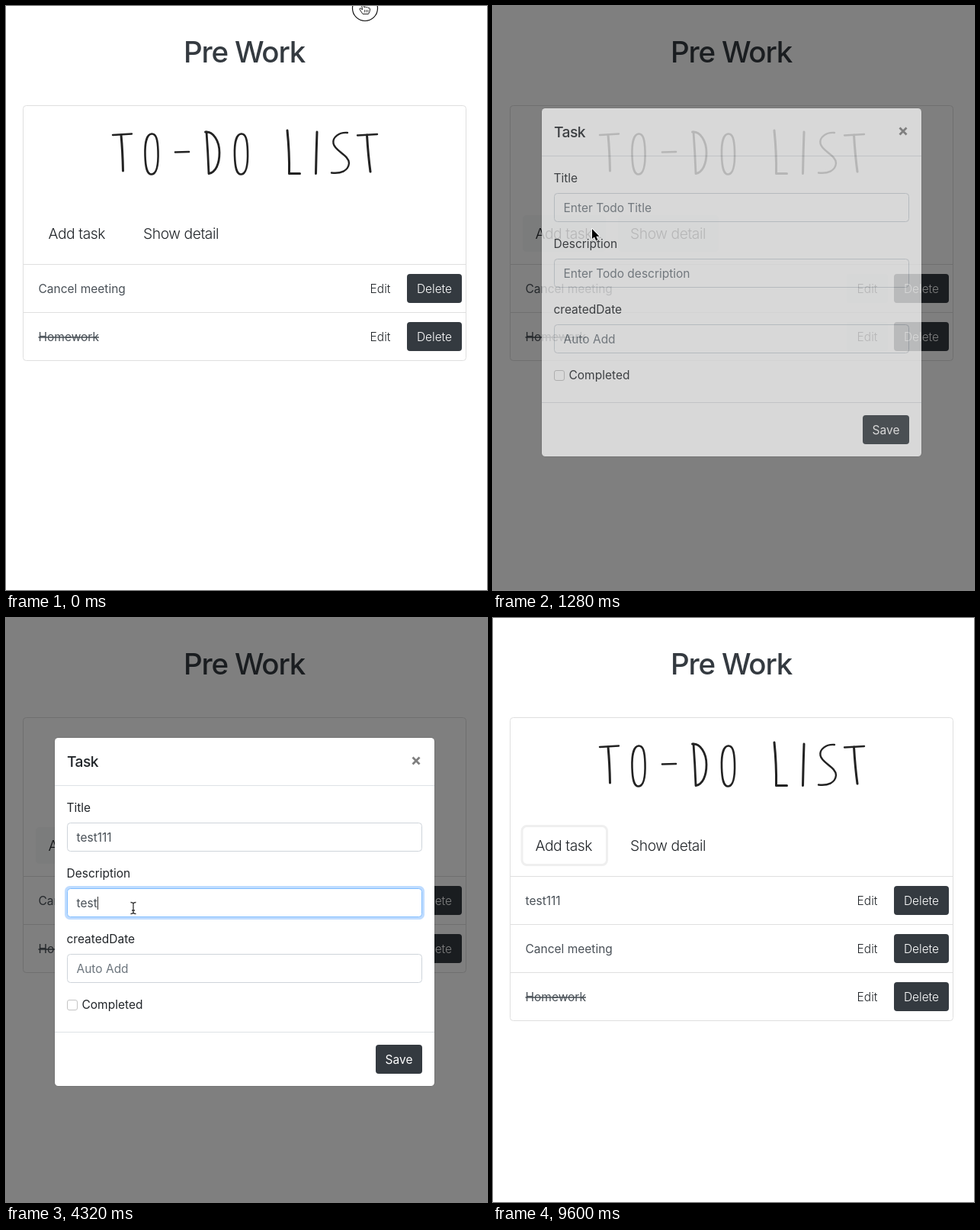
Write an HTML page that moves like this. It is 631 px wide and 765 px high and loops after 9760 ms.

```html
<!DOCTYPE html>
<html lang="en">
<head>
<meta charset="utf-8">
<title>To-do list</title>
<style>
  html, body { margin: 0; width: 100%; height: 100%; overflow: hidden; background: #fff; }
  svg { display: block; width: 631px; height: 765px; }
  text {
    font: 400 15.5px Inter, "Open Sans", sans-serif;
    font-optical-sizing: none;
    fill: #212529;
    white-space: pre;
  }
  .mid { text-anchor: middle; }
  .h1 { font-size: 38.5px; font-weight: 500; letter-spacing: -1.2px; fill: #343a40; }
  .h5 { font-size: 19.3px; font-weight: 500; letter-spacing: -.6px; }
  .big { font-size: 19.3px; font-weight: 300; letter-spacing: -.45px; }
  .thin { font-weight: 300; }
  .item, .value { fill: #495057; }
  .done { text-decoration: line-through; }
  .hint { fill: #6c757d; }
  .white { fill: #fff; }
  .dark { fill: #343a40; }
  .light { fill: #f8f9fa; }
  .edge { fill: none; stroke: #dfdfdf; }
  .rule { stroke: #dee2e6; }
  .box { fill: #fff; stroke: #ced4da; }
  .glow { fill: #bfdcff; }
  .focus .box { stroke: #80bdff; }
  .field:not(.focus) .glow, .field:not(.focus) .caret { display: none; }
  .ink { fill: none; stroke: #232323; stroke-width: 3; stroke-linecap: round; stroke-linejoin: round; }
</style>
</head>
<body>
<svg viewBox="0 0 631 765">
  <g id="page">
    <text class="h1 mid" x="312.5" y="73.5">Pre Work</text>
    <rect id="card" class="edge" x="22.5" y="130.5" width="581" height="334" rx="4"/>
    <g class="ink">
      <path d="M140 169L165 167.5M461 169.5L487 168" stroke-width="2.4"/>
      <path d="M151 169Q153 190 153.5 216M473.500 169Q475 195 478 217"/>
      <path id="oval" d="M191 167.500C184 168 182 182 182.500 196C183 212 185 220.500 191 220.500C198 220 200 206 199.500 190C199 175 197 167 191 167.500Z" stroke-width="2.6"/>
      <use href="#oval" x="117.500"/>
      <path d="M222 191.500L240 191" stroke-width="2.6"/>
      <path d="M263 165Q265 192 266 219.500M261.500 165C272 164 280 177 280 192C280 207 275 218 266 219.500" stroke-width="2.8"/>
      <path d="M369 163Q372 192 371.500 219.500L385.500 219.500"/>
      <path d="M408 165Q407 192 406.500 219.500"/>
      <path d="M448 166C437 165 428 172 429.500 180C431 190 450 195 450 206C449 216 439 220 427 218.500" stroke-width="2.4"/>
    </g>
    <rect id="ring" x="38" y="272.500" width="111.500" height="51" rx="6.5" fill="#fff" stroke="#efefef" stroke-width="3"/>
    <g id="plates" class="light">
      <rect x="39" y="274" width="109" height="48" rx="5"/>
      <rect x="164" y="274" width="132" height="48" rx="5"/>
      <rect x="464" y="351" width="54" height="38" rx="4"/>
      <rect x="464" y="414" width="54" height="38" rx="4"/>
    </g>
    <text class="big" x="55.500" y="305">Add task</text>
    <text class="big" x="180" y="305">Show detail</text>
    <g id="rows"></g>
  </g>
  <rect id="shade" width="631" height="765"/>
  <g id="modal">
    <rect x="63.500" y="156.500" width="499" height="457" rx="5" fill="#000" opacity=".2"/>
    <rect class="white" x="64" y="157" width="498" height="456" rx="4.500"/>
    <text class="h5" x="80" y="195">Task</text>
    <path d="M533.500 182.500L542.500 191.500M542.500 182.500L533.500 191.500" stroke="#7f7f7f" stroke-width="2.8"/>
    <path class="rule" d="M64 219.500H562M64 542.500H562"/>
    <g id="fields"></g>
    <rect x="80.500" y="500.500" width="13" height="13" rx="2.500" fill="#fff" stroke="#c4c4c4"/>
    <text x="99.500" y="512">Completed</text>
    <rect class="dark" x="485" y="559" width="61" height="38" rx="4"/>
    <text class="white mid" x="515.500" y="584">Save</text>
  </g>
  <g id="cursor">
    <g id="ringed">
      <circle r="16.500" fill="#fff" stroke="#111" stroke-width="1.200"/>
    </g>
    <g id="hand">
      <path d="M-3 7.500L-7 1.500Q-7.500 -.5 -5.500 0L-3.500 2L-4.500 -5.500Q-3.500 -8 -2 -6L-1 -1Q.2 -3 1.400 -1Q3 -2.500 4 -.3Q6.200 -1.200 6.500 1Q6.700 4 4.500 7.500Z" fill="#fff" stroke="#222" stroke-linejoin="round"/>
      <path d="M-.5 2V5.500M1.700 2V5.500M3.800 2V5.500" stroke="#222" stroke-width=".8"/>
    </g>
    <g id="arrow">
      <path d="M0 0V13L3 10.500L5.200 15.500L7.500 14.500L5.400 9.700H9.500Z" transform="translate(.6 1.200)" stroke="#000" stroke-width="2" opacity=".13"/>
      <path d="M0 0V13L3 10.500L5.200 15.500L7.500 14.500L5.400 9.700H9.500Z" stroke="#fff" stroke-width="1.800" stroke-linejoin="round" paint-order="stroke"/>
    </g>
    <path id="beam" d="M-3.500 -7.500Q0 -7.500 0 -5.500Q0 -7.500 3.500 -7.500M0 -5.500V5.500M-3.500 7.500Q0 7.500 0 5.500Q0 7.500 3.500 7.500M-2 3H2" fill="none" stroke="#333" stroke-width="1.300"/>
  </g>
</svg>
<script>
const LOOP = 9760, TICK = 160, ROW = 63;
const $ = id => document.getElementById(id);
const show = (el, on) => el.style.display = on ? '' : 'none';
const clamp = v => Math.min(1, Math.max(0, v));
const easeOut = p => 1 - (1 - clamp(p)) ** 1.8;

// time, x, y, kind; held until the next step
const moves = [
  [0, 471, 3, 'ringed'], [160, 462, 18, 'arrow'], [320, 422, 70, 'arrow'],
  [480, 320, 165, 'arrow'], [640, 190, 255, 'arrow'], [800, 125, 300, 'hand'],
  [960, 114, 304, 'hand'], [1120, 111, 298, 'arrow'], [1280, 130, 292, 'arrow'],
  [1440, 202, 269, 'beam'], [1600, 238, 284, 'beam'], [1760, 260, 275, 'beam'],
  [3360, 225, 330, 'beam'], [3520, 176, 402, 'beam'], [3680, 167, 380, 'beam'],
  [6240, 185, 402, 'beam'], [6400, 241, 488, 'arrow'], [6560, 430, 562, 'arrow'],
  [6720, 517, 589, 'hand'], [6880, 516, 583, 'arrow'], [7360, 430, 571, 'arrow'],
  [7520, 363, 564, 'arrow'], [7680, 355, 562, 'arrow'], [8000, 358, 530, 'arrow'],
  [8160, 375, 400, 'arrow'], [8320, 402, 230, 'arrow'], [8480, 442, 51, 'arrow'],
  [8640, 0, 0, 'none']
];
// moments at which each character appears
const typing = {
  title: { text: 'test111', at: [2080, 2240, 2400, 2560, 2880, 3040, 3200], focus: [1760, 3680] },
  description: {
    text: 'test111 des',
    at: [4000, 4160, 4320, 4320, 4640, 4800, 4960, 5440, 5600, 5760, 5920],
    focus: [3680, 7200]
  }
};

const row = (label, i, cls = '') => {
  const y = 338 + i * ROW;
  return `<g><path class="edge" d="M23 ${y + .5}H603"/>
    <text class="item ${cls}" x="42.500" y="${y + 38}">${label}</text>
    <text class="thin mid" x="491" y="${y + 38}">Edit</text>
    <rect class="dark" x="526" y="${y + 13}" width="72" height="38" rx="4"/>
    <text class="white thin mid" x="562" y="${y + 38}">Delete</text></g>`;
};
$('rows').innerHTML = `<g id="added">${row('test111', 0)}</g>
  <g id="older">${row('Cancel meeting', 0)}${row('Homework', 1, 'done')}</g>`;

const field = (id, label, hint, y) => `<g class="field" id="${id}">
  <text x="79.500" y="${y - 14}">${label}</text>
  <rect class="glow" x="77" y="${y - 3}" width="472" height="44" rx="6.500"/>
  <rect class="box" x="80.500" y="${y + .5}" width="465" height="37" rx="4"/>
  <text class="hint" x="92.500" y="${y + 25}">${hint}</text>
  <text class="value" x="92.500" y="${y + 25}"></text>
  <rect class="caret" y="${y + 11}" width="1" height="17" fill="#333"/></g>`;
$('fields').innerHTML =
  field('title', 'Title', 'Enter Todo Title', 268) +
  field('description', 'Description', 'Enter Todo description', 354) +
  field('date', 'createdDate', 'Auto Add', 440);

function drawField(id, t) {
  const { text, at, focus } = typing[id], el = $(id);
  const typed = text.slice(0, at.filter(a => a <= t).length);
  const value = el.querySelector('.value');
  value.textContent = typed;
  show(el.querySelector('.hint'), !typed);
  el.classList.toggle('focus', t >= focus[0] && t < focus[1]);
  const width = typed ? value.getComputedTextLength() : 0;
  el.querySelector('.caret').setAttribute('x', Math.round(92.5 + width));
}

function drawModal(t) {
  const closing = t > 6770;
  const since = closing ? t - 6770 : t - 1176;
  const fade = clamp(since / 150), slide = easeOut(since / 300);
  const opacity = closing ? 1 - fade : fade;
  const dy = Math.round(-50 * (closing ? slide : 1 - slide));
  $('modal').setAttribute('opacity', opacity);
  $('modal').setAttribute('transform', `translate(0 ${dy})`);
  const dim = .5 * (t < 6900 ? clamp((t - 1036.6) / 150) : 1 - clamp((t - 7000) / 150));
  $('shade').setAttribute('opacity', dim);
  show($('plates'), dim > 0);
}

function drawCursor(t) {
  const [, x, y, kind] = moves.findLast(m => m[0] <= t);
  for (const k of ['ringed', 'arrow', 'beam']) show($(k), k === kind);
  show($('hand'), kind === 'hand' || kind === 'ringed');
  $('cursor').setAttribute('transform', `translate(${x} ${y})`);
}

function draw(t) {
  const added = t >= 7360;
  show($('added'), added);
  show($('ring'), added);
  $('older').setAttribute('transform', `translate(0 ${added ? ROW : 0})`);
  $('card').setAttribute('height', 334 + (added ? ROW : 0));
  drawModal(t);
  drawField('title', t);
  drawField('description', t);
  drawCursor(t);
}

const start = performance.now();
let last = -1;
function loop() {
  const t = Math.floor((performance.now() - start) % LOOP / TICK) * TICK;
  if (t !== last) draw(last = t);
  requestAnimationFrame(loop);
}
loop();
</script>
</body>
</html>
```
